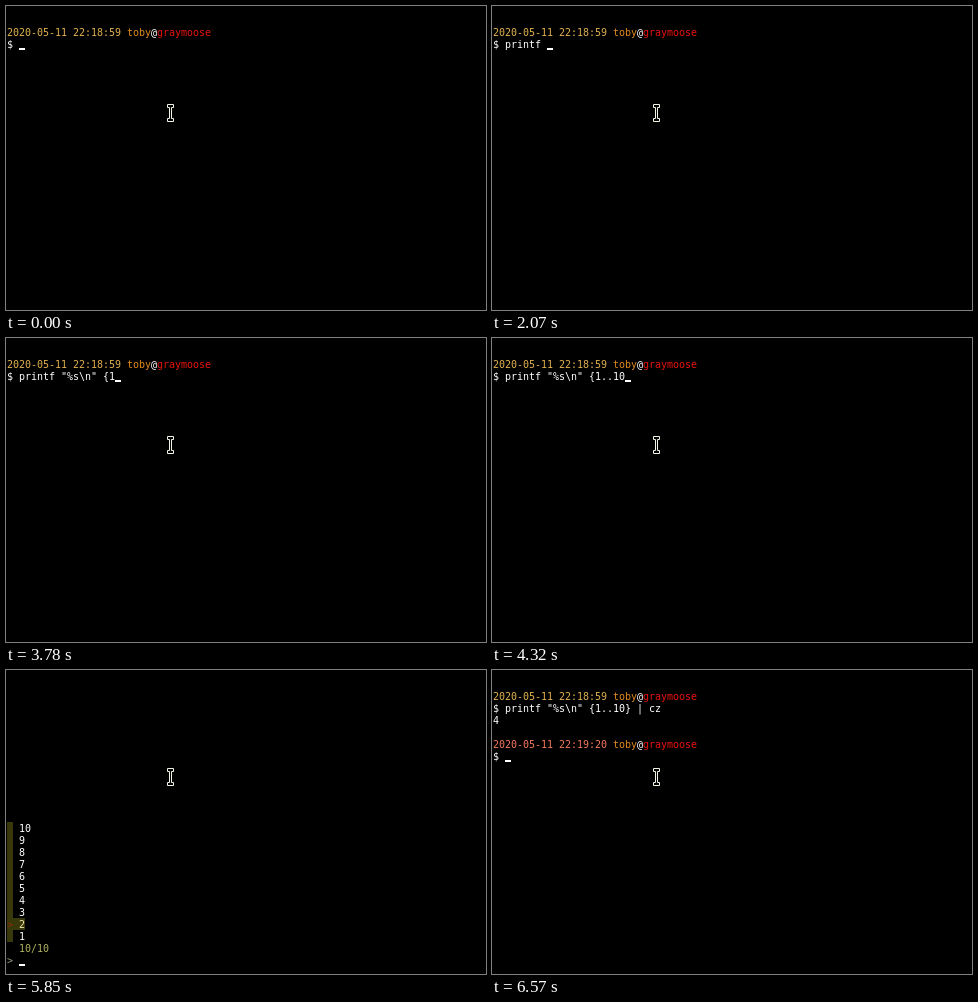
These frames come from a looping animation (480x304 px, 8000 ms). An HTML page with a canvas:

```html
<!DOCTYPE html>
<html lang="en">
<head>
<meta charset="utf-8">
<title>Terminal session</title>
<style>
  html, body { margin: 0; width: 480px; height: 304px; overflow: hidden; background: #000; }
  canvas { display: block; }
</style>
</head>
<body>
<canvas id="screen" width="480" height="304"></canvas>
<script>
const ctx = document.getElementById('screen').getContext('2d');
const LOOP = 8000, CELL_W = 6, CELL_H = 12, LEFT = 1, TOP = 20;
const WHITE = '#fff', OLIVE = '#38380a';

// One time per key press; \b is a backspace.
const KEYS = 'printf "%s\\n" "\b{1..10} | cz';
const TIMES = [
  1200, 1290, 1380, 1500, 1620, 1740, 2070,
  2160, 2280, 2370, 2460, 2580, 2730, 2820, 2970, 3210,
  3420, 3780, 4020, 4110, 4230, 4320, 4560, 4650, 4950, 4980, 5190, 5280
];
const ENTER = 5430, CLEAR = 5460, LIST = 5520, PICK = 6390, OUTPUT = 6450, PROMPT = 6540;
const MOVES = [5850, 6000, 6150];

const colX = col => LEFT + col * CELL_W;
const rowY = row => TOP + row * CELL_H;

function box(x, y, w, h, color) {
  ctx.fillStyle = color;
  ctx.fillRect(x, y, w, h);
}

function write(row, col, text, color = WHITE) {
  ctx.fillStyle = color;
  [...text].forEach((ch, i) => ctx.fillText(ch, colX(col + i), rowY(row) + 10));
}

function cursor(row, col) {
  box(colX(col), rowY(row) + 10, CELL_W, 2, WHITE);
}

function prompt(row, clock, color) {
  write(row, 0, '2020-05-11 ' + clock, color);
  write(row, 20, 'toby', '#e08a1c');
  write(row, 24, '@');
  write(row, 25, 'graymoose', '#e8140c');
  write(row + 1, 0, '$');
}

function typed(t) {
  let line = '';
  TIMES.forEach((time, i) => {
    if (t >= time) line = KEYS[i] === '\b' ? line.slice(0, -1) : line + KEYS[i];
  });
  return line;
}

function shell(t) {
  const line = typed(t);
  prompt(0, '22:18:59', '#e0b050');
  write(1, 2, line);
  if (t >= OUTPUT) write(2, 0, '4');
  if (t >= PROMPT) {
    prompt(4, '22:19:20', '#f0785c');
    cursor(5, 2);
  } else if (t >= OUTPUT) cursor(3, 0);
  else if (t >= ENTER) cursor(2, 0);
  else cursor(1, 2 + line.length);
}

function picker(t) {
  const selected = 1 + MOVES.filter(time => t >= time).length;
  write(22, 0, '>', '#98987c');
  cursor(22, 2);
  if (t < LIST) return;
  box(LEFT, rowY(11), CELL_W, 10 * CELL_H, OLIVE);
  for (let n = 1; n <= 10; n++) {
    const row = 21 - n, active = n === selected;
    if (active) {
      box(LEFT, rowY(row), 3 * CELL_W, CELL_H, OLIVE);
      write(row, 0, '>', '#8c2c0c');
    }
    write(row, 2, String(n), active ? '#f0e8a8' : WHITE);
  }
  write(21, 2, '10/10', '#b0b060');
}

function pointer() {
  const beam = new Path2D('M161.5 98.5h6v3h-2v11h2v3h-6v-3h2v-11h-2z');
  ctx.fillStyle = '#000';
  ctx.fill(beam);
  ctx.strokeStyle = '#f4f4e4';
  ctx.lineWidth = 1;
  ctx.stroke(beam);
}

function draw() {
  const t = performance.now() % LOOP;
  box(0, 0, 480, 304, '#000');
  ctx.font = '10px "DejaVu Sans Mono", monospace';
  if (t >= CLEAR && t < PICK) picker(t);
  else shell(t);
  pointer();
  requestAnimationFrame(draw);
}
draw();
</script>
</body>
</html>
```
